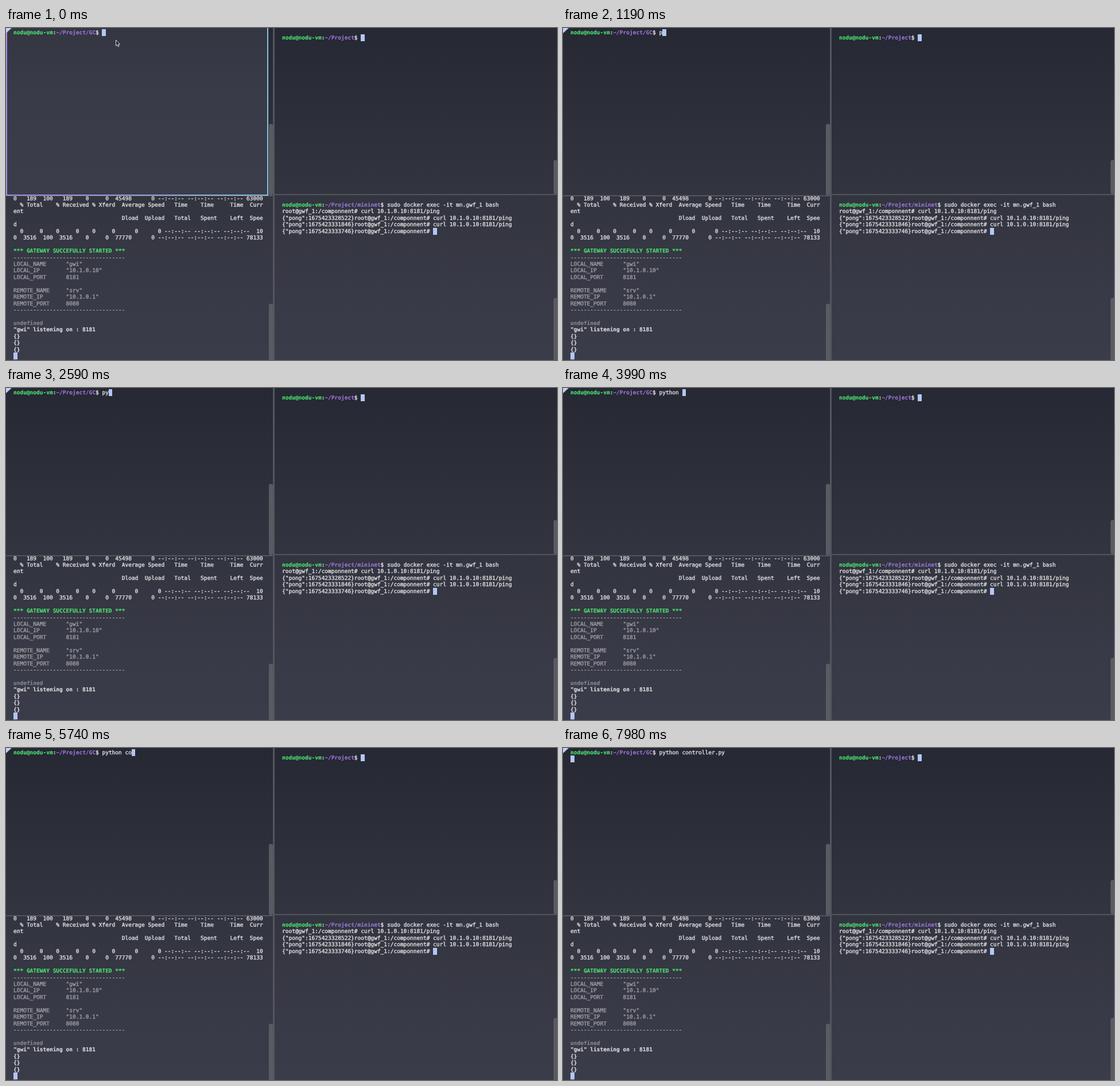
Animation of 960 by 578 pixels, one loop 8 s. Source, as an HTML page:

```html
<!DOCTYPE html>
<html lang="en">
<head>
<meta charset="utf-8">
<title>Terminal panes</title>
<style>
html, body { margin: 0; width: 100%; height: 100%; overflow: hidden; background: #3a3b49; }
#stage {
  position: absolute; left: 0; top: 0; width: 960px; height: 578px; overflow: hidden;
  background: linear-gradient(#262833, #2b2d38 20%, #32343f 50%, #393a47 80%, #3b3c4a);
}
#stage > * { position: absolute; }
pre {
  margin: 0; color: #dededf; white-space: pre;
  font: 9.51px/11.43px "DejaVu Sans Mono", monospace;
  text-rendering: geometricPrecision; -webkit-text-stroke: .4px;
}
pre b { -webkit-text-stroke: .15px; }
.user { color: #4be36f; }
.path { color: #9a74d6; }
.dim { color: #9c9ca1; }
.faint { color: #85868c; }
.caret {
  display: inline-block; width: 6.5px; height: 12px; margin: -1px 0;
  vertical-align: top; background: #b3c6f6;
}
#clip { left: 0; top: 293px; width: 458px; height: 285px; overflow: hidden; }
#clip pre { position: absolute; left: 13px; top: -1.4px; }
.rule { background: #55565d; }
.bar { background: #595b62; border-radius: 3px; width: 7px; }
#focus {
  left: 0; top: 0; width: 457px; height: 292px;
  background: linear-gradient(90deg, #a58de0, #9a9ce0 40%, #82c4dc);
}
#focus::after {
  content: ""; position: absolute; left: 2px; top: 0; right: 2px; bottom: 2px;
  background: linear-gradient(#343642, #393b48 40%, #3b3d4b);
}
#corner { left: 0; top: 0; width: 10px; height: 9px; background: #c0cff5; clip-path: polygon(0 0, 100% 0, 0 100%); }
</style>
</head>
<body>
<div id="stage">
  <div class="rule" style="left:465px;top:0;width:3px;height:578px"></div>
  <div class="rule" style="left:0;top:291px;width:466px;height:2px"></div>
  <div class="rule" style="left:467px;top:289px;width:493px;height:2px"></div>
  <div class="bar" style="left:458px;top:167px;height:124px"></div>
  <div class="bar" style="left:458px;top:480px;height:102px"></div>
  <div class="bar" style="left:954px;top:230px;height:59px"></div>
  <div class="bar" style="left:954px;top:470px;height:112px"></div>

  <div id="focus"></div>
  <div id="corner"></div>
  <pre id="shell" style="left:13px;top:3px"></pre>
  <pre id="idle" style="left:481px;top:12px"></pre>
  <pre id="client" style="left:481px;top:303px"></pre>
  <div id="clip"><pre id="gateway"></pre></div>

  <svg id="pointer" style="left:190px;top:20px" width="10" height="15">
    <path d="M1.5 1V11L3.8 8.8 5.4 12.5 7 11.8 5.5 8.3H8.5Z" fill="#15161c" stroke="#e8e8ea"/>
  </svg>
</div>
<script>
const LOOP = 8000, FOCUS_END = 1190, POINTER_END = 600;
const $ = id => document.getElementById(id);
const caret = '<i class="caret"></i>';
const prompt = path =>
  `<b><span class="user">nodu@nodu-vm</span>:<span class="path">${path}</span></b>$ `;

// [time, text typed so far]
const typing = [
  [0, ''], [1190, 'p'], [1750, 'py'], [2800, 'pyt'], [3000, 'pyth'], [3200, 'pytho'],
  [3430, 'python'], [3700, 'python '], [4760, 'python c'], [5250, 'python co'],
  [6300, 'python controller.py '], [7140, 'python controller.py\n']
];

$('idle').innerHTML = prompt('~/Project') + caret;

const root = 'root@gwf_1:/componnent# ', curl = 'curl 10.1.0.10:8181/ping';
$('client').innerHTML = prompt('~/Project/mininet') + 'sudo docker exec -it mn.gwf_1 bash\n' +
  root + curl + '\n' +
  `{"pong":1675423328522}${root}${curl}\n` +
  `{"pong":1675423331846}${root}${curl}\n` +
  `{"pong":1675423333746}${root}${caret}`;

const dashes = '-'.repeat(34), clocks = Array(3).fill('--:--:--').join(' ');
$('gateway').innerHTML = `0   189  100   189    0     0  45498      0 ${clocks} 63000
  % Total    % Received % Xferd  Average Speed   Time    Time     Time  Curr
ent
${' '.repeat(33)}Dload  Upload   Total   Spent    Left  Spee
d
  0     0    0     0    0     0      0      0 ${clocks}  10
0  3516  100  3516    0     0  77770      0 ${clocks} 78133

<b class="user">*** GATEWAY SUCCEFULLY STARTED ***</b>
<span class="dim">${dashes}
LOCAL_NAME      "gwi"
LOCAL_IP        "10.1.0.10"
LOCAL_PORT      8181

REMOTE_NAME     "srv"
REMOTE_IP       "10.1.0.1"
REMOTE_PORT     8080
${dashes}</span>

<b class="faint">undefined</b>
<b>"gwi" listening on : 8181
{}
{}
{}</b>
${caret}`;

let shown;
function draw() {
  const t = performance.now() % LOOP;
  const text = typing.findLast(([start]) => t >= start)[1];
  if (text !== shown) {
    shown = text;
    $('shell').innerHTML = prompt('~/Project/GC') + text + caret;
  }
  $('focus').hidden = t >= FOCUS_END;
  $('pointer').style.visibility = t < POINTER_END ? 'visible' : 'hidden';
  requestAnimationFrame(draw);
}
draw();
</script>
</body>
</html>
```
